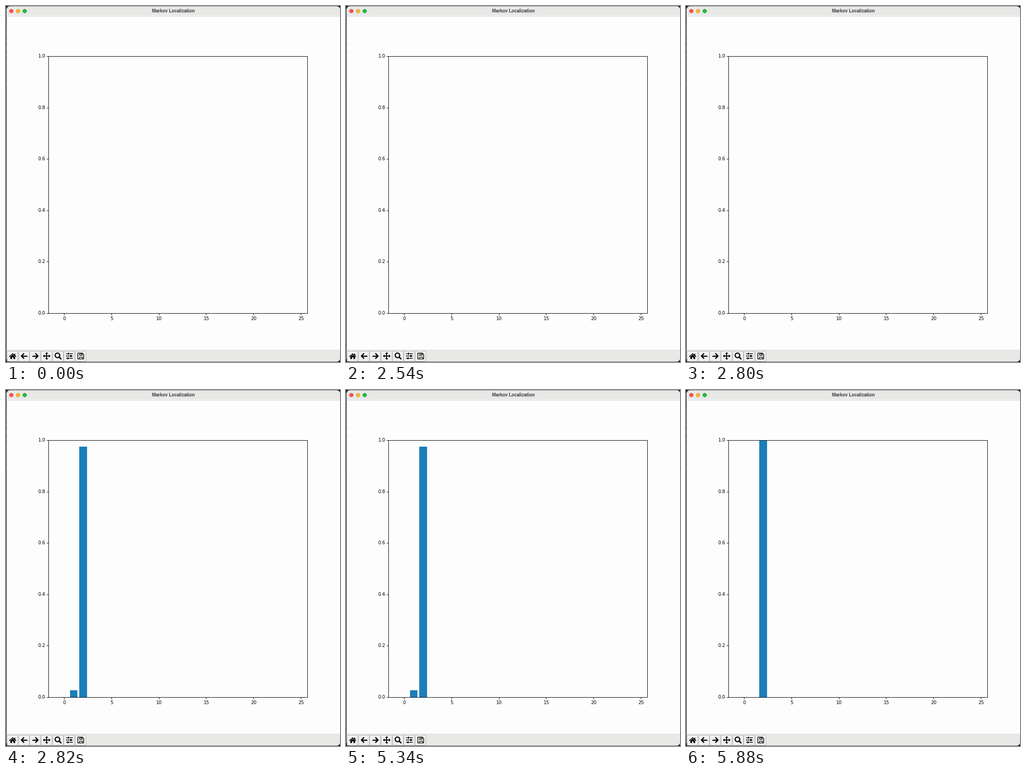
Animation, 725 px wide and 773 px high, one loop 8 s. Source, as a matplotlib script:

```python
import matplotlib.pyplot as plt
from matplotlib.animation import FuncAnimation
from matplotlib.patches import Circle, FancyBboxPatch, Polygon, Rectangle

W, H, DPI = 725, 773, 64
STEP_MS, LOOP_MS = 20, 8000
PT = 72 / DPI  # points per pixel

LEFT, RIGHT, TOP, BOTTOM = 92.5, 654.5, 108.5, 666.5
X0, UNIT = 126.2, 20.58  # pixel of x = 0 and pixels per x unit
PAPER, CHROME, DARK = "#fdfdfd", "#e8e8e7", "#17171f"
BLUE = "#1c7eb9"

# (start in ms, belief in cells 1 and 2)
BELIEFS = [(0, (0, 0)), (2820, (0.026, 0.974)), (5620, (0, 1))]

fig = plt.figure(figsize=(W / DPI, H / DPI), dpi=DPI, facecolor=DARK)
ax = fig.add_axes([0, 0, 1, 1])
ax.set_xlim(0, W)
ax.set_ylim(H, 0)
ax.axis("off")


def rect(x0, y0, x1, y1, color, edge="none", lw=0, z=1):
    return ax.add_patch(Rectangle((x0, y0), x1 - x0, y1 - y0, facecolor=color,
                                  edgecolor=edge, lw=lw * PT, zorder=z))


def line(points, lw=1.0, color="black", z=5, cap="butt"):
    xs, ys = zip(*points)
    ax.plot(xs, ys, color=color, lw=lw * PT, zorder=z,
            solid_capstyle=cap, solid_joinstyle="miter")


def shape(points, color="black", z=5):
    ax.add_patch(Polygon(points, facecolor=color, edgecolor="none", zorder=z))


def label(x, y, s, ha, size=10, color="black", **font):
    ax.text(x, y, s, ha=ha, va="baseline", fontsize=size * PT,
            color=color, zorder=6, **font)


def draw_window():
    for i in range(9):
        color = "#b03a42" if i in (0, 4) else "#5c5c66"
        rect(0, 43 + 15.8 * i, 1, 45 + 15.8 * i, color)
    body = FancyBboxPatch((1.3, 0.7), W - 1.3, 771.5,
                          boxstyle="round,pad=0,rounding_size=8",
                          facecolor=PAPER, edgecolor="none", zorder=1)
    ax.add_patch(body)
    for y0, y1 in ((0, 21), (746, H)):
        rect(0, y0, W, y1, CHROME, z=2).set_clip_path(body)
    line([(1.3, 21.5), (W, 21.5)], color="#d4d4d4", z=2)
    lights = (("#fb524b", "#d9413b"), ("#fcb42b", "#dc9a22"), ("#22b83c", "#1a9a30"))
    for i, (fill, edge) in enumerate(lights):
        ax.add_patch(Circle((11.6 + 14.5 * i, 11), 4, facecolor=fill,
                            edgecolor=edge, lw=0.8 * PT, zorder=4))
    label(363.5, 14, "Markov Localization", "center", 9.75, "#3c3c3c",
          family="Liberation Sans", weight="bold")


def draw_axes():
    line([(LEFT, TOP), (RIGHT, TOP), (RIGHT, BOTTOM), (LEFT, BOTTOM),
          (LEFT, TOP), (RIGHT, TOP)])
    for v in range(0, 26, 5):
        x = int(X0 + v * UNIT) + 0.5
        line([(x, BOTTOM), (x, BOTTOM + 4)])
        label(X0 + v * UNIT, 681.7, str(v), "center", family="DejaVu Sans")
    for i in range(6):
        y = int(BOTTOM - i * (BOTTOM - TOP) / 5) + 0.5
        line([(LEFT - 4, y), (LEFT, y)])
        label(85.3, y + 3.9, f"{i / 5:.1f}", "right", family="DejaVu Sans")


def home(x, y):
    line([(x - 7.3, y + 1.5), (x, y - 4.8), (x + 7.3, y + 1.5)], 1.8)
    rect(x + 3.4, y - 5.5, x + 5.6, y - 0.5, "black", z=5)
    shape([(x - 5.2, y + 1.7), (x, y - 2.7), (x + 5.2, y + 1.7),
           (x + 5.2, y + 6.5), (x + 1.5, y + 6.5), (x + 1.5, y + 2.7),
           (x - 1.5, y + 2.7), (x - 1.5, y + 6.5), (x - 5.2, y + 6.5)])


def arrow(x, y, d):
    line([(x - 6.5 * d, y), (x + 5 * d, y)], 2.5)
    line([(x, y - 5.8), (x + 5.6 * d, y), (x, y + 5.8)], 2.6)


def move(x, y):
    line([(x - 6, y), (x + 6, y)], 2)
    line([(x, y - 6), (x, y + 6)], 2)
    for dx, dy in ((1, 0), (-1, 0), (0, 1), (0, -1)):
        tip = (x + 8.2 * dx, y + 8.2 * dy)
        bx, by = x + 4.8 * dx, y + 4.8 * dy
        shape([tip, (bx + 3.4 * dy, by + 3.4 * dx), (bx - 3.4 * dy, by - 3.4 * dx)])


def zoom(x, y):
    ax.add_patch(Circle((x - 1.3, y - 1.4), 5, fill=False,
                        edgecolor="black", lw=2.3 * PT, zorder=5))
    line([(x + 2.6, y + 2.5), (x + 6.2, y + 6.1)], 3, cap="round")


def sliders(x, y):
    for dy, knob in ((-5, -1.8), (0, 3.5), (5, -3.2)):
        line([(x - 7.3, y + dy), (x + 7.3, y + dy)], 1.5)
        rect(x + knob - 2.6, y + dy - 2.2, x + knob + 2.6, y + dy + 2.2, "#f0f0ef", z=5)
        rect(x + knob - 1.6, y + dy - 2.2, x + knob + 1.6, y + dy + 2.2, "black", z=6)


def save(x, y):
    line([(x - 6.4, y), (x - 6.4, y - 6.4), (x + 3.4, y - 6.4), (x + 6.4, y - 3.4),
          (x + 6.4, y + 6.4), (x - 6.4, y + 6.4), (x - 6.4, y)], 1.4)
    line([(x - 3.7, y + 6.4), (x - 3.7, y + 1.6), (x + 3.7, y + 1.6),
          (x + 3.7, y + 6.4)], 1.3)
    line([(x - 3.7, y - 6.4), (x - 3.7, y - 2), (x + 2.8, y - 2),
          (x + 2.8, y - 6.4)], 1.3)
    rect(x, y - 6.4, x + 2.2, y - 3, "black", z=5)


def draw_toolbar():
    icons = (home, lambda x, y: arrow(x, y, -1), lambda x, y: arrow(x, y, 1),
             move, zoom, sliders, save)
    for i, icon in enumerate(icons):
        x = 14.6 + 24.6 * i
        rect(int(x - 11) - 0.5, 748.5, int(x + 11) + 0.5, 770.5,
             "#f0f0ef", "#b4b4b4", 1, z=3)
        icon(x, 760)


draw_window()
draw_axes()
draw_toolbar()
bars = []
for cell in (1, 2):
    x = X0 + cell * UNIT
    bars.append(rect(x - 0.4 * UNIT, BOTTOM, x + 0.4 * UNIT, BOTTOM, BLUE, z=3))


def update(i):
    belief = [b for start, b in BELIEFS if start <= i * STEP_MS][-1]
    for bar, p in zip(bars, belief):
        bar.set_height(-p * (BOTTOM - TOP))
        bar.set_visible(p > 0)
    return bars


anim = FuncAnimation(fig, update, frames=LOOP_MS // STEP_MS, interval=STEP_MS,
                     repeat=True, repeat_delay=0, blit=False)
plt.show()
```
